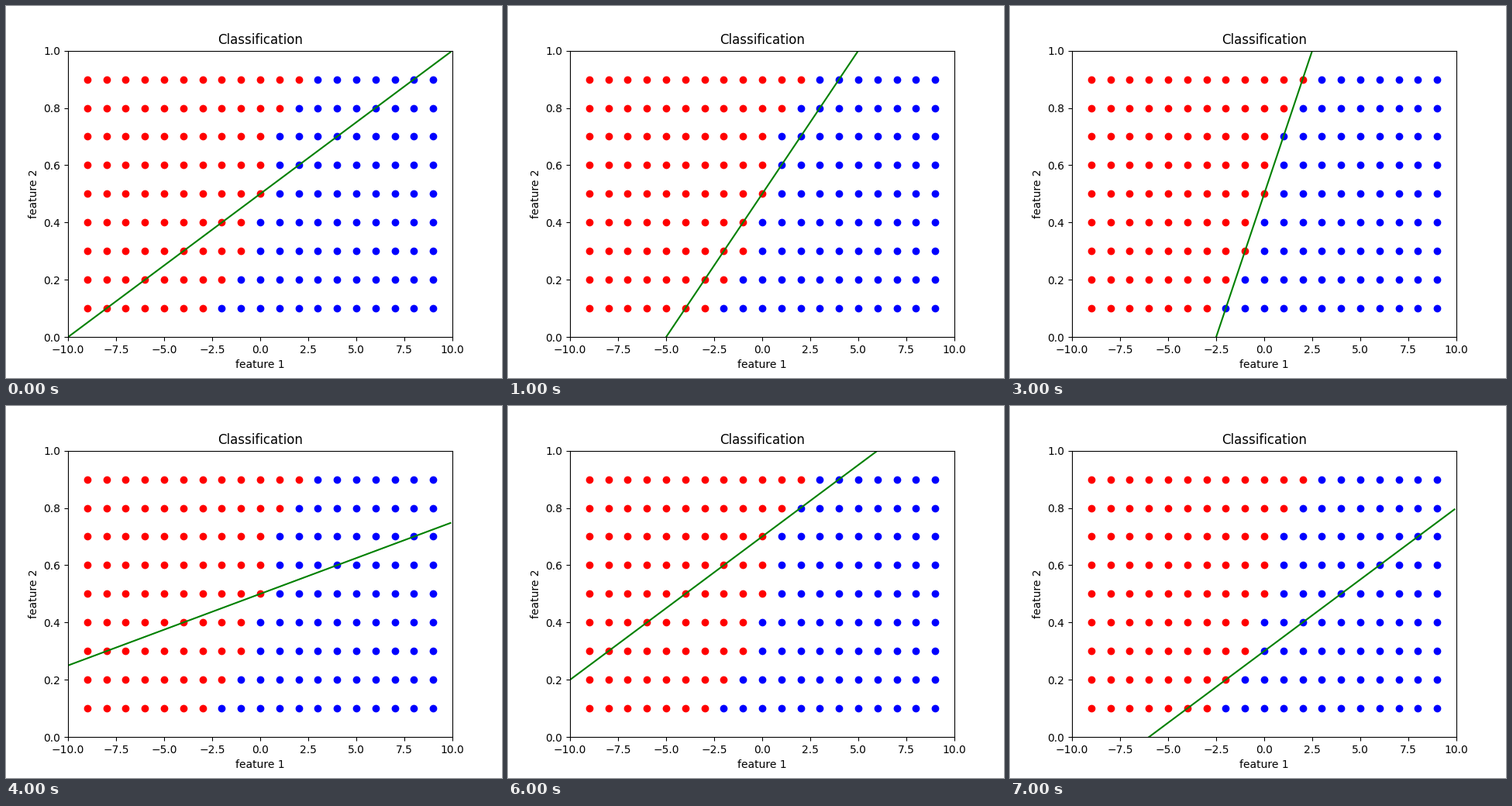
Animation, 640 px wide and 480 px high, one loop 8000 ms. Source, as a matplotlib script:

```python
import numpy as np
import matplotlib.pyplot as plt
from matplotlib.animation import FuncAnimation

STEPS = 8      # one boundary per second
TILTS = 5      # steps that turn the line; the rest slide it
RUN = 20       # feature 1 units per unit of feature 2
MID = 0.5
SHIFT = 0.2

plt.rcParams["font.family"] = "DejaVu Sans"
fig, ax = plt.subplots(figsize=(6.4, 4.8), dpi=100)
ax.set(xlim=(-10, 10), ylim=(0, 1), title="Classification",
       xlabel="feature 1", ylabel="feature 2")

# Points on or above the logistic curve are red, the rest blue
gx, gy = np.meshgrid(np.arange(-9, 10), np.arange(1, 10) / 10)
above = gy >= 1 / (1 + np.exp(-gx))
for mask, color in ((above, "red"), (~above, "blue")):
    ax.scatter(gx[mask], gy[mask], color=color)

x = np.arange(-10, 10, 0.1)
line, = ax.plot(x, x / RUN + MID, color="green")


def boundary(step):
    """Tilt steeper and flatter by turns, then slide up and down."""
    if step >= TILTS:
        slide = (step - TILTS + 1) % 3 - 1   # 0, 1, -1
        return x / RUN + MID + SHIFT * slide
    if step % 2:
        run = RUN / 2 ** ((step + 1) // 2)   # each one twice as steep
    else:
        run = RUN * (1 + step / 4)           # each one half a run flatter
    return x / run + MID


def update(step):
    line.set_ydata(boundary(step))
    return line,


anim = FuncAnimation(fig, update, frames=STEPS, interval=1000,
                     repeat=True, repeat_delay=0)
plt.show()
```
